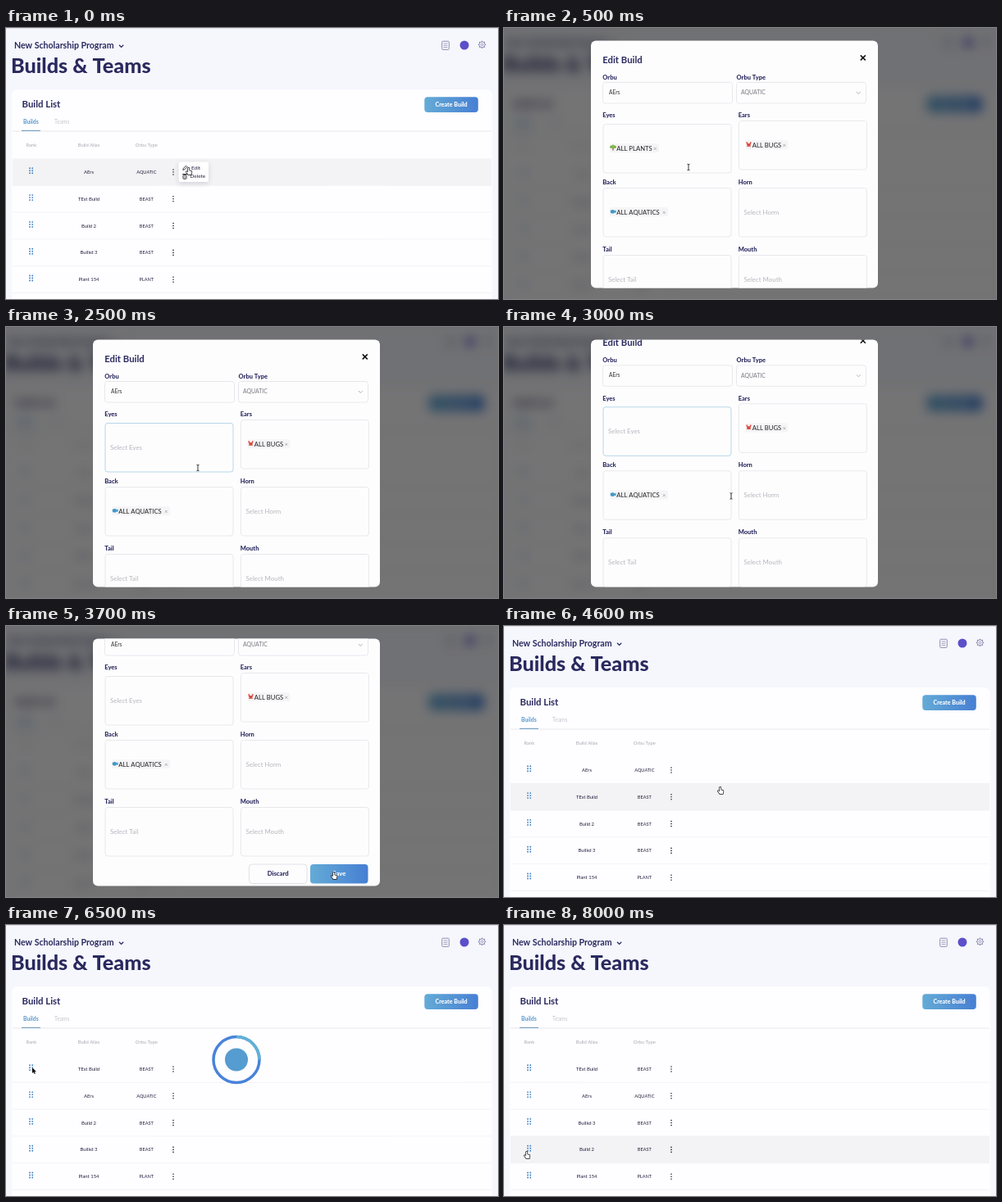
An HTML page with a canvas that plays this animation: 600 by 331 pixels, repeating every 8.1 s.

```html
<!DOCTYPE html>
<html lang="en">
<head>
<meta charset="utf-8">
<title>Builds and Teams</title>
<style>
html, body { margin: 0; width: 100%; height: 100%; overflow: hidden; background: #f6f7fd; }
canvas { display: block; width: 600px; height: 331px; }
</style>
</head>
<body>
<canvas id="stage"></canvas>
<script>
const W = 600, H = 331, LOOP = 8100, ROW = 32.8;
const NAVY = '#29295f', INK = '#22213f', MUTED = '#a9a9b4', EDGE = '#e3e2e8';
const canvas = document.getElementById('stage');
const ctx = canvas.getContext('2d');
const dpr = window.devicePixelRatio || 1;
canvas.width = W * dpr;
canvas.height = H * dpr;

const ROWS = [['AErs', 'AQUATIC'], ['TEst Build', 'BEAST'], ['Build 2', 'BEAST'],
  ['Builkd 3', 'BEAST'], ['Plant 154', 'PLANT']];

// time, x, y
const CURSOR = [
  [0, 223, 175], [300, 225, 170], [1000, 225, 170], [1400, 185, 147], [1700, 185, 147],
  [2300, 234, 172], [2800, 234, 172], [3400, 400, 305], [4000, 400, 305], [4500, 288, 268],
  [4600, 264, 201], [4900, 264, 201], [5400, 30, 208], [5600, 30, 208], [6000, 32, 177],
  [6900, 32, 177], [7300, 30, 245], [7500, 30, 245], [7900, 28, 281]
];

const clamp = v => Math.max(0, Math.min(1, v));
const ease = v => v * v * (3 - 2 * v);
const ramp = (t, from, to) => ease(clamp((t - from) / (to - from)));
const mix = (a, b, p) => a + (b - a) * p;

function cursorAt(t) {
  const i = CURSOR.findIndex(k => k[0] > t);
  if (i < 0) return CURSOR[CURSOR.length - 1].slice(1);
  const [t0, x0, y0] = CURSOR[i - 1], [t1, x1, y1] = CURSOR[i];
  const p = ramp(t, t0, t1);
  return [mix(x0, x1, p), mix(y0, y1, p)];
}

function text(s, x, y, size, color, weight = 400, align = 'left') {
  ctx.font = `${weight} ${size}px Lato, sans-serif`;
  ctx.fillStyle = color;
  ctx.textAlign = align;
  ctx.fillText(s, x, y);
}

function box(x, y, w, h, r, fill, stroke, width = 0.8) {
  ctx.beginPath();
  ctx.roundRect(x, y, w, h, r);
  if (fill) { ctx.fillStyle = fill; ctx.fill(); }
  if (stroke) { ctx.strokeStyle = stroke; ctx.lineWidth = width; ctx.stroke(); }
}

function line(points, color, width) {
  ctx.beginPath();
  points.forEach(([x, y]) => ctx.lineTo(x, y));
  ctx.strokeStyle = color;
  ctx.lineWidth = width;
  ctx.stroke();
}

function dot(x, y, r, color) {
  ctx.beginPath();
  ctx.arc(x, y, r, 0, Math.PI * 2);
  ctx.fillStyle = color;
  ctx.fill();
}

function ring(x, y, r, color, width, from = 0, to = Math.PI * 2) {
  ctx.beginPath();
  ctx.arc(x, y, r, from, to);
  ctx.strokeStyle = color;
  ctx.lineWidth = width;
  ctx.stroke();
}

function blueButton(x, y, w, h, label, size) {
  const g = ctx.createLinearGradient(x, 0, x + w, 0);
  g.addColorStop(0, '#64abd6');
  g.addColorStop(1, '#477fd3');
  box(x, y, w, h, 4, g);
  text(label, x + w / 2, y + h / 2 + 2.3, size, '#fff', 800, 'center');
}

function topIcons() {
  const c = '#8585aa';
  box(531.7, 16.2, 8.6, 10.2, 1, null, c, 0.9);
  for (let i = 0; i < 3; i++) line([[533.5, 19 + i * 2.3], [538.5, 19 + i * 2.3]], c, 0.7);
  dot(559, 21, 5.5, '#5b50c9');
  ring(580.5, 20.3, 3.6, c, 0.9);
  ring(580.5, 20.3, 1.4, c, 0.8);
  for (let i = 0; i < 8; i++) {
    const a = i * Math.PI / 4, u = Math.cos(a), v = Math.sin(a);
    line([[580.5 + u * 3.6, 20.3 + v * 3.6], [580.5 + u * 4.7, 20.3 + v * 4.7]], c, 1.3);
  }
}

function drawRow([alias, type], slot, lit, lifted) {
  const y = 159.5 + slot * ROW, mid = y + 16;
  if (lifted) {
    ctx.save();
    ctx.shadowColor = 'rgba(40,40,80,.15)';
    ctx.shadowBlur = 5 * dpr;
    box(7, y, 586, ROW, 0, '#f5f4f6');
    ctx.restore();
  } else if (lit) {
    box(8, y, 584, ROW, 0, '#f3f2f4');
  }
  line([[8, y + ROW], [592, y + ROW]], '#f0eff3', 0.8);
  for (let i = 0; i < 6; i++) {
    dot(29 + (i % 2) * 3.2, mid - 4.2 + (i >> 1) * 3, 0.95, '#3f83c4');
  }
  text(alias, 101, mid + 2.4, 5.9, INK, 400, 'center');
  text(type, 171.3, mid + 2.4, 5.6, INK, 400, 'center');
  for (let i = -1; i < 2; i++) dot(204, mid + 0.5 + i * 3, 0.8, '#222');
}

function drawRows(t, hover) {
  const first = ramp(t, 5600, 6000), second = ramp(t, 7500, 7900);
  const slots = [first, 1 - first, 2 + second, 3 - second, 4];
  const held = t > 5600 && t < 6100 ? 1 : t > 7500 && t < 7900 ? 2 : -1;
  ROWS.forEach((row, i) => {
    if (i !== held) drawRow(row, slots[i], held < 0 && Math.round(slots[i]) === hover);
  });
  if (held >= 0) drawRow(ROWS[held], slots[held], true, true);
}

function drawPage(t, hover) {
  ctx.fillStyle = '#f6f7fd';
  ctx.fillRect(0, 0, W, H);
  ctx.fillStyle = '#dfdfe5';
  ctx.fillRect(0, 0, W, 1);
  text('New Scholarship Program', 10, 24.6, 10.6, NAVY, 700);
  line([[138, 20.8], [140.6, 23.4], [143.2, 20.8]], NAVY, 1.3);
  text('Builds & Teams', 6, 54.7, 25.2, NAVY, 800);
  topIcons();

  box(7, 75, 586, 270, 7, '#fefdff');
  text('Build List', 19.5, 97.2, 11.4, NAVY, 700);
  blueButton(510.3, 84.2, 65.5, 18.8, 'Create Build', 7.1);
  text('Builds', 21, 116.5, 6.9, '#5797cb', 700);
  text('Teams', 59, 116.5, 6.7, '#c6c6d0');
  line([[8, 126], [592, 126]], '#e8e8ec', 1);
  line([[19, 125.4], [42, 125.4]], '#7ba3c4', 1.2);
  text('Rank', 24.5, 145, 5.8, MUTED);
  text('Build Alias', 101, 145, 5.8, MUTED, 400, 'center');
  text('Orbu Type', 171.3, 145, 5.8, MUTED, 400, 'center');
  drawRows(t, hover);
}

function drawMenu() {
  ctx.save();
  ctx.shadowColor = 'rgba(40,40,80,.16)';
  ctx.shadowBlur = 6 * dpr;
  ctx.shadowOffsetY = 2 * dpr;
  box(210.5, 163.5, 36.5, 24.5, 2, '#fff');
  ctx.restore();
  line([[215.8, 173.4], [216.4, 171.4], [219.6, 168.2], [221, 169.6], [217.8, 172.8], [215.8, 173.4]], '#222', 0.9);
  text('Edit', 226, 173, 6.4, INK);
  box(216, 179.5, 4, 4.8, 0.8, null, '#222', 0.9);
  line([[215, 178.6], [221, 178.6]], '#222', 0.9);
  line([[218, 180.5], [218, 183.4]], '#222', 0.7);
  text('Delete', 224.5, 183.2, 6.4, INK);
}

function tree(x, y) {
  dot(x - 2, y - 1, 1.8, '#6eae3f');
  dot(x + 2, y - 1, 1.8, '#6eae3f');
  dot(x, y - 2, 1.9, '#85bd4b');
  box(x - 0.7, y, 1.4, 3.3, 0, '#8d6b3d');
}

function bug(x, y) {
  dot(x, y + 0.6, 2, '#d94a3f');
  line([[x - 2.6, y - 3], [x - 1.4, y], [x + 1.4, y], [x + 2.6, y - 3]], '#d94a3f', 1.5);
  line([[x - 2.4, y + 2.6], [x, y], [x + 2.4, y + 2.6]], '#d94a3f', 0.9);
}

function fish(x, y) {
  ctx.beginPath();
  ctx.ellipse(x - 0.6, y, 2.7, 2.3, 0, 0, Math.PI * 2);
  ctx.moveTo(x + 1, y);
  ctx.lineTo(x + 3.6, y - 2);
  ctx.lineTo(x + 3.6, y + 2);
  ctx.fillStyle = '#3f9ac7';
  ctx.fill();
}

function slot(label, x, y, labelY, chip, hint, focused) {
  text(label, x - 0.8, labelY, 7.5, NAVY, 800);
  box(x, y, 156, 59.5, 3, '#fefdfe', focused ? '#a3cde4' : EDGE);
  const mid = y + 29.3;
  if (!chip) return text(hint, x + 6, mid + 2.7, 7.9, '#b6b5bc');
  const [name, icon, width] = chip;
  box(x + 8, mid - 5.5, width, 11, 2, '#f5f4f6');
  icon(x + 12, mid - 0.5);
  text(name, x + 16.3, mid + 2.7, 7.7, '#222');
  const cx = x + width + 3.3;
  line([[cx - 1.5, mid - 0.9], [cx + 1.5, mid + 2.1]], '#999', 0.7);
  line([[cx + 1.5, mid - 0.9], [cx - 1.5, mid + 2.1]], '#999', 0.7);
}

function drawModal(t) {
  const cleared = t >= 1500;
  box(106, 15.5, 350, 302, 6, '#fefdfe');
  ctx.save();
  ctx.beginPath();
  ctx.roundRect(106, 15.5, 350, 302, 6);
  ctx.clip();
  ctx.translate(0, -56 * ramp(t, 2800, 3300));
  text('Edit Build', 120.3, 43, 11.3, NAVY, 700);
  line([[434.8, 33.4], [440.8, 39.4]], '#111', 1.5);
  line([[440.8, 33.4], [434.8, 39.4]], '#111', 1.5);
  text('Orbu', 120.3, 63.2, 7.5, NAVY, 800);
  text('Orbu Type', 283.6, 63.2, 7.5, NAVY, 800);
  box(120.5, 66.5, 158, 25.5, 3, '#fefdfe', EDGE);
  box(283.5, 66.5, 158, 25.5, 3, '#fefdfe', EDGE);
  text('AErs', 128, 81, 6.6, '#333');
  text('AQUATIC', 289, 81.3, 6.9, '#77767e');
  line([[430, 78], [432.4, 80.4], [434.8, 78]], '#aaa', 0.9);
  slot('Eyes', 121, 117.5, 109.4, !cleared && ['ALL PLANTS', tree, 60], 'Select Eyes', cleared && t < 3500);
  slot('Ears', 286.5, 113.5, 109.4, ['ALL BUGS', bug, 52]);
  slot('Back', 121, 195.5, 191.2, ['ALL AQUATICS', fish, 71]);
  slot('Horn', 286.5, 195.5, 191.2, null, 'Select Horm');
  slot('Tail', 121, 277.5, 273.2, null, 'Select Tail');
  slot('Mouth', 286.5, 277.5, 273.2, null, 'Select Mouth');
  box(296.5, 347, 70.5, 23.5, 4, '#fefdfe', '#d9d8e2');
  text('Discard', 331.7, 360.9, 7.7, NAVY, 800, 'center');
  blueButton(371, 347, 70.5, 23.5, 'Save', 7.7);
  ctx.restore();
}

function drawOverlay(t, alpha) {
  ctx.save();
  ctx.globalAlpha = alpha;
  ctx.filter = `blur(${7 * dpr}px)`;
  ctx.drawImage(canvas, -8, -4, W + 16, H + 12);
  ctx.filter = 'none';
  ctx.fillStyle = 'rgba(0,0,0,.54)';
  ctx.fillRect(0, 0, W, H);
  drawModal(t);
  ctx.restore();
}

function drawSpinner(t) {
  const turn = t / 1000 * Math.PI * 2 - Math.PI * 1.5;
  ring(281, 164.5, 28, '#4883da', 3.5);
  ring(281, 164.5, 28, '#62b1d5', 3.5, turn, turn + Math.PI / 2);
  dot(281, 164.5, 14, '#559cd0');
}

const HAND = new Path2D('M-1.2 1.5V-3.2Q-1.2-4.2-.4-4.2T.4-3.2V-.7L2.8-.2Q3.6 0 3.5.9L3 4H-.8L-3.2.9Q-3-.2-2.2.3Z');
const ARROW = new Path2D('M0-3V4L1.6 2.7L2.7 5L3.9 4.4L2.8 2.2H5Z');

function drawCursor(kind, x, y) {
  ctx.save();
  ctx.translate(x, y);
  ctx.lineJoin = 'round';
  if (kind === 'beam') {
    line([[0, -3.5], [0, 3.5]], '#222', 0.9);
    line([[-1.6, -3.8], [0, -3.2], [1.6, -3.8]], '#222', 0.8);
    line([[-1.6, 3.8], [0, 3.2], [1.6, 3.8]], '#222', 0.8);
  } else {
    const hand = kind === 'hand';
    ctx.fillStyle = hand ? '#fff' : '#111';
    ctx.strokeStyle = hand ? '#111' : '#fff';
    ctx.lineWidth = hand ? 1.4 : 0.5;
    ctx.stroke(hand ? HAND : ARROW);
    ctx.fill(hand ? HAND : ARROW);
  }
  ctx.restore();
}

function cursorKind(t, busy) {
  if (busy) return 'arrow';
  const typing = t >= 200 && t < 1300 || t >= 1900 && t < 3200;
  return typing ? 'beam' : 'hand';
}

function draw(t) {
  const [x, y] = cursorAt(t);
  const alpha = Math.min(clamp(t / 300), 1 - clamp((t - 3900) / 300));
  const busy = t >= 6100 && t < 7000;
  const hover = busy || alpha > 0 ? -1 : Math.floor((y - 159.5) / ROW);
  ctx.setTransform(dpr, 0, 0, dpr, 0, 0);
  drawPage(t, hover);
  if (t < 100) drawMenu();
  if (alpha > 0) drawOverlay(t, alpha);
  if (busy) drawSpinner(t);
  drawCursor(cursorKind(t, busy), x, y);
}

const start = performance.now();
function tick() {
  const elapsed = (performance.now() - start) % LOOP;
  draw(Math.floor(elapsed / 100) * 100);
  requestAnimationFrame(tick);
}
tick();
</script>
</body>
</html>
```
